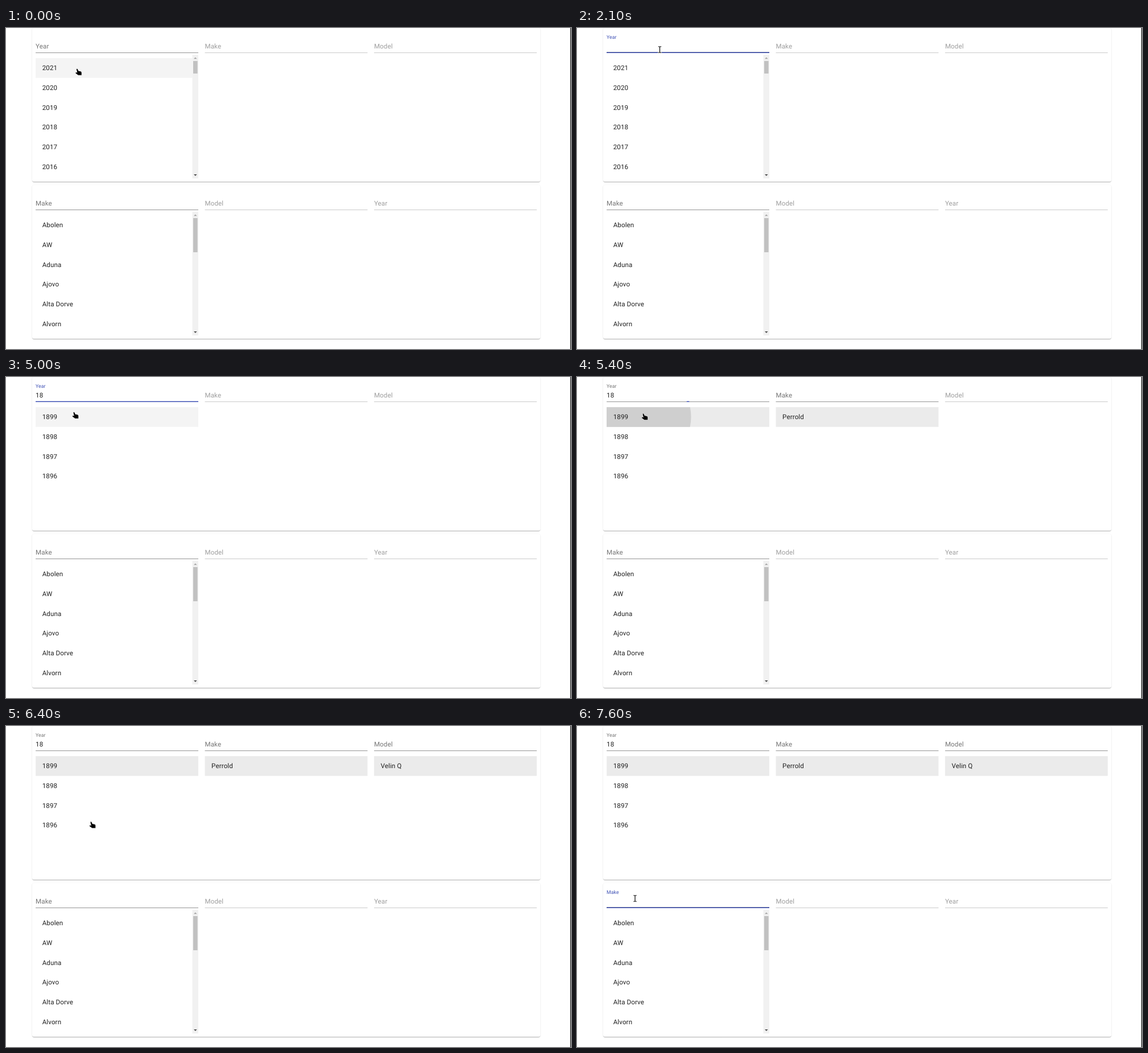
An HTML page for the animation above (8 s loop, 993 by 564 pixels).

```html
<!DOCTYPE html>
<html lang="en">
<head>
<meta charset="utf-8">
<title>Cascading pickers</title>
<style>
  html, body { margin: 0; width: 100%; height: 100%; overflow: hidden; background: #fff; }
  .card {
    position: absolute; left: 46.3px; width: 892.4px; height: 270px; border-radius: 2.9px; background: #fff;
    box-shadow: 0 1.45px .72px -.72px rgba(0,0,0,.2), 0 .72px .72px rgba(0,0,0,.14), 0 .72px 2.2px rgba(0,0,0,.12);
  }
  svg { position: absolute; left: 0; top: 0; }
  text {
    font-family: Roboto, sans-serif; font-size: 11.58px; letter-spacing: .00938em;
    fill: #212121; text-rendering: geometricPrecision;
  }
</style>
</head>
<body>
<div class="card" style="top:0"></div>
<div class="card" style="top:276px"></div>
<svg id="stage" width="993" height="564" viewBox="0 0 993 564"></svg>
<script>
const LOOP = 8000, STEP = 100;
const COL_X = 52.1, COL_PITCH = 297.4, COL_W = 285.9;
const ROW_TOP = 52.9, ROW_H = 34.75, CARD_PITCH = 276;
const INDIGO = '#3f51b5', GREY = '#757575', PALE = '#9e9e9e';
const stage = document.getElementById('stage');

function add(parent, tag, attrs = {}, content) {
  const node = document.createElementNS('http://www.w3.org/2000/svg', tag);
  set(node, attrs);
  if (content !== undefined) node.textContent = content;
  parent.appendChild(node);
  return node;
}
function set(node, attrs) {
  for (const key in attrs) node.setAttribute(key, attrs[key]);
}
function show(node, visible) {
  node.style.display = visible ? '' : 'none';
}
const rect = (parent, x, y, width, height, fill) => add(parent, 'rect', { x, y, width, height, fill });
const colX = col => COL_X + col * COL_PITCH;
const clamp01 = v => Math.min(1, Math.max(0, v));
const easeOut = v => 1 - (1 - clamp01(v)) ** 3;

function makeField(parent, col, name) {
  const x = colX(col);
  return {
    x,
    line: rect(parent, x, 43, COL_W, 1, '#949494'),
    hover: rect(parent, x, 42.5, COL_W, 1.5, '#212121'),
    focus: rect(parent, x, 42.5, COL_W, 1.5, INDIGO),
    label: add(parent, 'text', { x }, name)
  };
}

function drawField(field, { enabled = true, hovered = false, focus = 0, shrink = 0 }) {
  set(field.line, { fill: enabled ? '#949494' : '#cacaca' });
  show(field.hover, hovered);
  show(field.focus, focus > 0);
  set(field.focus, { x: field.x + COL_W * (1 - focus) / 2, width: COL_W * focus });
  set(field.label, { y: 36.2 - 16.9 * shrink });
  field.label.style.fontSize = 11.58 - 2.89 * shrink + 'px';
  field.label.style.fill = !enabled ? PALE : focus > 0.3 ? INDIGO : GREY;
}

function makeRows(parent, col, names) {
  const group = add(parent, 'g');
  names.forEach((name, i) =>
    add(group, 'text', { x: colX(col) + 11.6, y: ROW_TOP + ROW_H * (i + .5) + 3.95 }, name));
  return group;
}

function makeScrollbar(parent, thumbHeight) {
  const group = add(parent, 'g');
  rect(group, 327.5, 47.1, 10.5, 217.2, '#f1f1f1');
  rect(group, 329, 58, 7.6, thumbHeight, '#c1c1c1');
  add(group, 'path', { d: 'M330 54.3h5.6l-2.8-2.9z', fill: '#a3a3a3' });
  add(group, 'path', { d: 'M330 257.1h5.6l-2.8 2.9z', fill: '#505050' });
  return group;
}

const makeRow = (parent, col, fill, width = COL_W) => rect(parent, colX(col), ROW_TOP, width, ROW_H, fill);

// Upper card
const upper = add(stage, 'g');
const clip = add(add(upper, 'defs'), 'clipPath', { id: 'firstRow' });
makeRow(clip, 0, '#000');
const hoverRow = makeRow(upper, 0, '#f4f4f4');
const picked = [0, 1, 2].map(col => makeRow(upper, col, '#ebebeb'));
const ripple = add(upper, 'circle', { cx: 118, cy: 70, fill: '#cfcfcf', 'clip-path': 'url(#firstRow)' });
const upperFields = ['Year', 'Make', 'Model'].map((name, col) => makeField(upper, col, name));
const recentYears = makeRows(upper, 0, [2021, 2020, 2019, 2018, 2017, 2016]);
const oldYears = makeRows(upper, 0, [1899, 1898, 1897, 1896]);
const makeList = makeRows(upper, 1, ['Perrold']);
const modelList = makeRows(upper, 2, ['Velin Q']);
const upperBar = makeScrollbar(upper, 22);
const typed = add(upper, 'text', { x: COL_X, y: 36 }, '18');
const upperCaret = rect(upper, COL_X, 25.1, .8, 13.8, '#212121');

// Lower card
const lower = add(stage, 'g', { transform: `translate(0 ${CARD_PITCH})` });
const lowerFields = ['Make', 'Model', 'Year'].map((name, col) => makeField(lower, col, name));
makeRows(lower, 0, ['Abolen', 'AW', 'Aduna', 'Ajovo', 'Alta Dorve', 'Alvorn']);
makeScrollbar(lower, 60);
const lowerCaret = rect(lower, COL_X, 25.1, .8, 13.8, '#212121');

rect(stage, 991.7, 0, 1.3, 564, '#2b2b2b');

// Pointers are drawn around their centre
const pointer = add(stage, 'g');
const outlined = { fill: '#000', stroke: '#fff', 'stroke-width': 1.2, 'paint-order': 'stroke', 'stroke-linejoin': 'round' };
const shapes = {
  hand: 'M-3.6-5.3Q-2.6-6.4-1.6-5L-.3-2 3.4-1.3Q5.2-.8 5.2 1V5.2H-.6L-5 1.9Q-5.5.5-4.1.4L-2.2 1z',
  arrow: 'M-3.5-6V4.6L-1 2.5.6 6 2.3 5.2.8 1.8H4z',
  text: 'M-2.7-5.8H-.6L0-5.3.6-5.8H2.7V-4.8H.6V4.8H2.7V5.8H.6L0 5.3-.6 5.8H-2.7V4.8H-.6V-4.8H-2.7z'
};
const pointers = {};
for (const kind in shapes) pointers[kind] = add(pointer, 'path', { d: shapes[kind], ...outlined });
pointers.hand.style.filter = 'drop-shadow(.5px .8px .5px rgba(0,0,0,.35))';

const route = [
  [0, 127.5, 77.5], [100, 121.5, 81.5], [400, 121.5, 81.5], [500, 119.5, 86.5], [600, 119.5, 86.5],
  [700, 121, 80], [1000, 133, 55], [1300, 145.5, 38], [4700, 145.5, 38], [4900, 131, 56],
  [5000, 122, 67.5], [5300, 119, 70], [6100, 119, 70], [6400, 152, 174], [6700, 126, 268],
  [7000, 102, 303], [LOOP, 102, 303]
];
function pointerAt(t) {
  const i = route.findIndex(key => key[0] > t);
  const [t0, x0, y0] = route[i - 1], [t1, x1, y1] = route[i];
  const k = (t - t0) / (t1 - t0);
  return [x0 + (x1 - x0) * k, y0 + (y1 - y0) * k];
}
function pointerKind(y) {
  if (y < 46 || y > 286) return 'text';
  return y >= 54 && y < 191 ? 'hand' : 'arrow';
}

const between = (t, from, to) => t >= from && t < to;

function draw(t) {
  const [x, y] = pointerAt(t), kind = pointerKind(y);
  const hasText = t >= 3200, makeReady = t >= 5400, modelReady = t >= 5600;

  set(pointer, { transform: `translate(${x} ${y})` });
  for (const name in pointers) show(pointers[name], name === kind);

  show(hoverRow, kind === 'hand' && t < 5400);
  set(hoverRow, { width: hasText ? COL_W : 275.4 });
  [makeReady, makeReady, modelReady].forEach((on, i) => show(picked[i], on));
  show(ripple, between(t, 5300, 5600));
  set(ripple, { r: Math.max(0, 20 + (t - 5300) * .625) });

  show(recentYears, !hasText);
  show(upperBar, !hasText);
  show(oldYears, hasText);
  show(typed, hasText);
  show(makeList, makeReady);
  show(modelList, modelReady);

  const yearIn = easeOut((t - 1480) / 200), yearOut = easeOut((t - 5250) / 200);
  drawField(upperFields[0], { hovered: kind === 'text' && y < 46, focus: yearIn * (1 - yearOut), shrink: yearIn });
  drawField(upperFields[1], { enabled: makeReady });
  drawField(upperFields[2], { enabled: modelReady });

  const makeIn = easeOut((t - 7030) / 170);
  drawField(lowerFields[0], { hovered: y > 286, focus: makeIn, shrink: makeIn });
  drawField(lowerFields[1], { enabled: false });
  drawField(lowerFields[2], { enabled: false });

  set(upperCaret, { x: hasText ? 65.2 : COL_X });
  show(upperCaret, between(t, 1500, 2100) || between(t, 3200, 3800) || between(t, 4400, 5000));
  show(lowerCaret, between(t, 7100, 7600));
}

const start = performance.now();
function tick() {
  const t = (performance.now() - start) % LOOP;
  draw(Math.floor(t / STEP) * STEP);
  requestAnimationFrame(tick);
}
tick();
</script>
</body>
</html>
```
